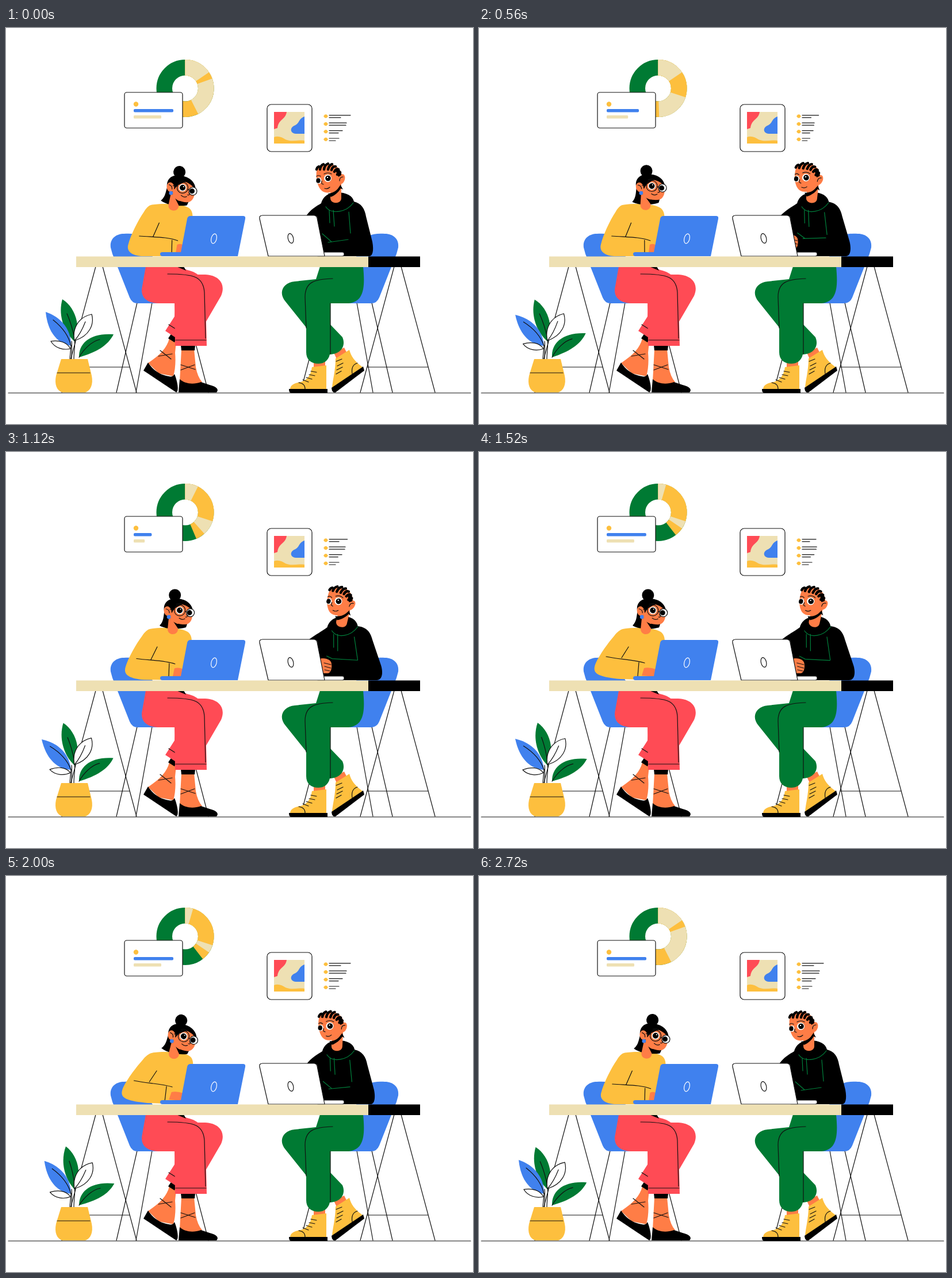
Animation, 812 px wide and 689 px high, one loop 2800 ms. Source, as an HTML page:

```html
<!DOCTYPE html>
<html lang="en">
<head>
<meta charset="utf-8">
<title>Two people at a shared desk</title>
<style>
html, body { margin: 0; width: 100%; height: 100%; overflow: hidden; background: #fff; }
svg { display: block; width: 100%; height: 100%; }
.blue { fill: #4081ee; }
.yellow { fill: #fdbf3e; }
.beige { fill: #eee0b3; }
.green { fill: #007a33; }
.red { fill: #ff4b55; }
.skin { fill: #ff7d46; }
.white { fill: #fff; }
.ink { fill: none; stroke: #111; stroke-width: 1.2; stroke-linecap: round; stroke-linejoin: round; }
.white.ink { fill: #fff; }
.seam { fill: none; stroke: #00803c; stroke-width: 1.2; stroke-linecap: round; }
#donut circle { fill: none; stroke-width: 27.5; }
</style>
</head>
<body>
<svg viewBox="0 0 812 689" xmlns="http://www.w3.org/2000/svg">
  <defs>
    <g id="chair">
      <path class="ink" stroke-width="1" d="M228 478L192 634M254 478L226 634M311 478L352 634"/>
      <path class="blue" d="M182 382C180 367 191 358 205 358C216 357 226 358 235 362L300 479H229Q219 479 215 469L185 393Z"/>
    </g>
  </defs>

  <g id="donut" transform="rotate(-90 311.5 105)"></g>
  <g>
    <rect class="white ink" x="206" y="112" width="101" height="62" rx="4"/>
    <circle class="yellow" cx="226" cy="132.500" r="4.200"/>
    <rect class="blue" id="bar1" x="222" y="141" height="5.600" rx="2"/>
    <rect class="beige" id="bar2" x="222" y="152" height="5.400" rx="1.500"/>
  </g>

  <g>
    <rect class="white ink" x="454" y="133" width="78" height="82" rx="7"/>
    <path class="beige" d="M466 146H519V201H466Z"/>
    <path class="red" d="M466 146H488C486 160 474 158 472 174L466 176Z"/>
    <path class="blue" d="M519 154C508 158 511 166 501 170C493 174 494 183 504 184H519Z"/>
    <path class="yellow" d="M466 190C473 187 480 190 486 194C497 199 508 194 519 196V201H466Z"/>
  </g>
  <g id="list"></g>

  <path class="ink" d="M4 635H808"/>
  <path class="ink" d="M156 415L97 634M168 415L227 634M109 590H215M687 415L746 634M675 415L616 634M628 590H734"/>
  <use href="#chair"/>
  <use href="#chair" transform="translate(864) scale(-1 1)"/>

  <g id="plant">
    <path class="ink" d="M111 576L113 552M114 576C114 562 115 552 114 545M118 576C118 562 121 550 119 542"/>
    <g id="leaf0">
      <path class="green" d="M120 546C101 530 90 500 98 472C113 481 123 500 124 518C124 532 122 540 120 546Z"/>
      <path class="ink" d="M106 497Q116 520 120 546"/>
    </g>
    <g id="leaf1">
      <path class="white ink" d="M119 544C115 524 125 503 149 498C154 516 145 536 119 544Z"/>
      <path class="ink" d="M119 544Q130 532 138 511"/>
    </g>
    <g id="leaf2">
      <path class="blue" d="M113 553C86 548 72 525 69 494C96 503 114 525 113 553Z"/>
      <path class="ink" d="M113 553C109 535 96 519 82 508"/>
    </g>
    <path class="white ink" id="leaf3" d="M112 558C100 561 85 557 78 545C92 543 106 546 112 558Z"/>
    <g id="leaf4">
      <path class="green" d="M127 573C126 548 147 530 187 533C177 553 157 564 127 573Z"/>
      <path class="ink" d="M127 573C135 559 149 545 163 542"/>
    </g>
    <path class="yellow" d="M96 576H142L149 605C152 620 147 631 138 634H98C88 631 84 620 87 605Z"/>
    <path class="ink" d="M89 600H146"/>
  </g>

  <g id="womanLegs">
    <path class="skin" d="M284 540L296 545L294 565Q296 588 291 606L266 601L247 583C263 572 279 560 284 540Z"/>
    <path d="M288 531L282 540L293 547L297 538Z"/>
    <path d="M247 582L239 596L296 634C300 633 300 620 293 602C290 607 288 607 283 606C268 604 255 595 247 582Z"/>
    <path class="ink" d="M268 561L287 576M265 571L289 567"/>
    <path class="skin" d="M305 559H327L330 590Q333 607 341 616L322 626L302 615Z"/>
    <path d="M304 552H329L328 561H305Z"/>
    <path d="M302 611L300 634H366C371 629 366 624 354 621L339 616C325 621 311 619 302 611Z"/>
    <path class="ink" d="M304 586L329 594M304 595L328 586"/>
    <path class="red" d="M300 429H346C373 430 382 448 374 466L342 521L300 542L277 527L293 502Z"/>
    <path class="ink" d="M283 516L294 523"/>
    <path class="red" d="M243 415H300L315 421C338 426 348 440 347 470L349 553H294L293 479H264C241 478 233 465 237 449Z"/>
    <path d="M296 415H309L313 422Z"/>
    <path class="ink" d="M281 428C326 428 343 432 345 460L347 540M295 543H348"/>
  </g>

  <g id="manLegs">
    <path class="skin" d="M535 580H555V594H535ZM570 565L588 556L593 566L575 576Z"/>
    <path class="yellow" d="M573 575L597 560C600 571 606 580 620 590L567 626C568 612 573 596 573 575Z"/>
    <path d="M566 626L621 589L623 596L573 634Q567 636 566 626Z"/>
    <path class="ink" d="M574 580L584 576M576 588L586 583M575 595L585 590M574 602L583 597M602 602C600 590 604 585 611 583"/>
    <path class="yellow" d="M532 590L557 587V629H494C494 622 500 618 512 616C523 613 530 605 532 590Z"/>
    <path d="M492 628H559V635H495Q492 634 492 628Z"/>
    <path class="ink" d="M530 597L540 599M527 603L537 605M522 608L532 611M516 612L526 616M509 617C517 618 520 623 520 628"/>
    <path class="green" d="M546 415H621C624 448 624 476 596 479H564V516L585 538C591 552 584 567 563 568C560 580 552 584 543 584C529 584 522 576 522 564V521L486 476C473 461 481 443 502 441L539 437Z"/>
    <path class="ink" d="M568 436C536 437 520 442 520 468L522 522M564 479V567"/>
  </g>

  <g id="woman">
    <g id="torso">
      <path class="yellow" id="sweater"/>
      <path class="skin" id="hand"/>
      <path class="ink" id="folds"/>
    </g>
    <g id="head">
      <path d="M279 266C272 280 277 292 267 302C279 309 300 309 313 305L318 290V268Z"/>
      <path class="skin" d="M283 288L281 308C281 320 299 320 299 308V296Z"/>
      <path d="M291 295Q300 302 309 299L299 307Z"/>
      <path class="skin" d="M284 270C296 260 314 262 321 271L324 283C324 293 319 300 311 300C300 300 290 297 286 290Z"/>
      <circle cx="293.500" cy="249" r="10.500"/>
      <path d="M275 277C272 262 283 254 296 255C312 255 324 264 325 277C319 270 313 267 306 265C299 269 291 272 289 279L282 283Z"/>
      <ellipse class="skin" cx="281" cy="277" rx="6.500" ry="8.500" transform="rotate(-15 281 277)"/>
      <path class="ink" d="M278 273Q284 274 284 280M285 274L293 274M311 277L314 278"/>
      <circle class="blue" cx="283" cy="287" r="3.400"/>
      <circle class="white" cx="302" cy="275.500" r="6.500"/>
      <circle cx="302" cy="275.500" r="5"/>
      <circle class="ink" cx="302" cy="275.500" r="9.600" stroke-width="1.500"/>
      <circle class="white ink" cx="320.500" cy="279.500" r="7"/>
      <circle cx="319" cy="279.500" r="4.500"/>
      <circle class="white" cx="303.500" cy="273.500" r="1"/>
      <path class="ink" d="M296 265Q301 262 306 265M314 283Q317 288 312 287M301 289Q306 293 311 290"/>
    </g>
  </g>

  <g id="man">
    <path id="hoodie"/>
    <path class="seam" id="seams"/>
    <g id="fist">
      <path class="skin" d="M544 360C556 357 566 362 566 369C567 376 565 384 560 385H544Z"/>
      <path class="ink" d="M553 367L565 370M554 373L565 376M554 379L563 381"/>
    </g>
    <g id="face">
      <path class="skin" d="M564 276V296C564 307 583 307 583 296V270Z"/>
      <path d="M560 288C571 287 578 281 581 272L586 281L582 279C578 286 572 291 565 294Z"/>
      <path class="skin" d="M540 249C538 264 543 281 552 285C561 289 572 284 581 274L584 255C581 242 570 236 560 237C550 237 541 242 540 249Z"/>
      <ellipse class="skin" cx="583.500" cy="263" rx="5.500" ry="9" transform="rotate(18 583.500 263)"/>
      <path class="ink" d="M586 259Q580 259 580 266"/>
      <path d="M572 246C577 241 583 248 583 256L578 259Z"/>
      <path fill="none" stroke="#000" stroke-width="4.400" stroke-linecap="round" d="M540 246q1-4 4-5M546 246q1-7 6-9M553 246q1-8 7-10M560 246q2-8 7-9M566 247q2-7 7-6M571 250q3-6 7-4M576 255q2-5 5-4"/>
      <g id="eyes">
        <ellipse class="white" cx="544" cy="265.500" rx="4.500" ry="5.500"/>
        <circle class="white" cx="559.500" cy="261.500" r="6.500"/>
        <ellipse cx="543" cy="265.500" rx="3.700" ry="4.300"/>
        <circle cx="560" cy="261.500" r="4.800"/>
        <path class="white" d="M558 259h2v2h-2z"/>
      </g>
      <path class="ink" id="lids" d="M541 268Q545 271 549 268M556 264Q561 266 567 261"/>
      <path class="ink" d="M540 258Q543 255 547 258M553 254Q560 250 566 254M549 266L549 271L552 272M554 279Q559 281 563 277"/>
    </g>
  </g>

  <path class="blue" d="M321 327H412Q417 327 416 332L403 397H272Q268 397 268 393Q268 390 272 390H304L315 332Q316 327 321 327Z"/>
  <ellipse cx="361.500" cy="366.500" rx="4.600" ry="8.600" fill="none" stroke="#fff" stroke-width="1.200" transform="rotate(14 361.500 366.500)"/>
  <rect class="white ink" x="540" y="390" width="48" height="7" rx="3"/>
  <path class="white ink" d="M446 326H535Q540 326 541 331L554 397H456L441 332Q440 326 446 326Z"/>
  <ellipse class="ink" cx="495" cy="366" rx="4.600" ry="8.600" transform="rotate(-14 495 366)"/>

  <path class="beige" d="M122 397.500H630V416H122Z"/>
  <path d="M630 397.500H720V416H630Z"/>
</svg>
<script>
const LOOP = 2800, STEP = 80;
const BEATS = [0, 400, 800, 1520, 2000, 2400, 2720];
const BEIGE = '#eee0b3', YELLOW = '#fdbf3e', GREEN = '#007a33';
const $ = id => document.getElementById(id);

function add(parent, tag, attrs) {
  const el = document.createElementNS('http://www.w3.org/2000/svg', tag);
  for (const k in attrs) el.setAttribute(k, attrs[k]);
  return parent.appendChild(el);
}

// Eased value of a looping track
function at(t, values, times = BEATS) {
  let i = times.length - 1;
  while (i > 0 && times[i] > t) i--;
  if (t < times[0]) return values[0];
  const last = i === times.length - 1;
  const end = last ? LOOP : times[i + 1];
  const to = last ? values[0] : values[i + 1];
  const p = (t - times[i]) / (end - times[i]);
  return values[i] + (to - values[i]) * p * p * (3 - 2 * p);
}

// Blend two paths that share the same commands
function blend(a, b, k) {
  const nums = b.match(/[\d.]+/g);
  let i = 0;
  return a.replace(/[\d.]+/g, n => (+n + (nums[i++] - n) * k).toFixed(2));
}

const shapes = {
  sweater: [
    'M250 308C262 305 300 305 312 311C320 314 323 320 323 330L305 397L235 397C218 396 209 388 212 377C216 360 228 335 238 320C242 313 246 309 250 308Z',
    'M250 308C262 305 300 305 312 311C320 314 323 320 323 330L305 397L246 395C205 391 197 385 202 370C207 357 222 335 235 320C240 313 246 309 250 308Z'],
  hand: [
    'M297 377Q303 374 308 378L306 391L295 391Z',
    'M287 376Q296 374 308 378L306 391L283 389Z'],
  folds: [
    'M231 362C255 364 280 363 298 370M288 369L288 390M265 339L255 363',
    'M221 356C245 361 268 361 288 367M278 366L276 390M260 339L248 358'],
  hoodie: [
    'M548 305C552 290 565 286 575 286C592 286 603 292 605 302C618 305 624 315 626 328L637 372C640 388 637 397 632 397L548 397L541 328L522 327C530 315 540 310 548 305Z',
    'M559 305C563 290 577 286 587 286C600 286 610 292 612 303C628 305 634 313 638 328L653 372C657 386 654 397 645 397L548 397L541 328L526 327C538 318 550 312 559 305Z'],
  seams: [
    'M556 311C565 325 592 321 604 304M562 317L563 339M569 317L571 345M596 320L599 357M550 358L566 372M560 373L595 368',
    'M567 311C576 325 600 321 612 304M570 317L570 340M577 317L577 346M606 322L612 362M558 355L567 359M567 359L612 362']
};

const leaves = [
  { pivot: '120 546', sway: [0, -1.5, 0, 3, 4.6, 2.3, .4] },
  { pivot: '119 544', sway: [0, -2, -2, 1, 1.5, .6, .2] },
  { pivot: '113 553', sway: [0, -5, -7.8, -6.1, -2.3, -.6, 0] },
  { pivot: '112 558', sway: [0, -5.5, -11.5, -13, -8.5, -3.5, -.5] },
  { pivot: '127 573', sway: [0, -2, -1.7, 1, 2, 1, .2] }
];

// Slices are stacked, the widest at the back
const slices = [
  [GREEN, [360], [0]],
  [YELLOW, [200, 200, 142, 142, 200], [0, 880, 1240, 2120, 2400]],
  [BEIGE, [153, 153, 178, 178, 124, 124, 153], [0, 40, 400, 880, 1240, 2120, 2400]],
  [YELLOW, [70, 70, 108, 108, 70], [0, 40, 400, 2120, 2400]],
  [BEIGE, [56, 56, 16, 16, 56], [0, 880, 1240, 2120, 2400]]
].map(([stroke, values, times]) => ({
  values, times,
  el: add($('donut'), 'circle', { cx: 311.5, cy: 105, r: 36.25, pathLength: 360, stroke })
}));

const rows = [
  { long: 37, short: 20, dip: [.65, .65] },
  { long: 30, short: 29, dip: [.54, .84] },
  { long: 23, short: 16, dip: [.74, .9] },
  { long: 17, short: 11, dip: [.68, 1] }
];
rows.forEach((row, i) => {
  const y = 153.5 + 13.4 * i;
  add($('list'), 'path', { class: 'yellow', d: `M552 ${y}l2.500-3h3l2.500 3l-2.500 3h-3z` });
  row.lines = [-1.7, 2.3].map(dy => add($('list'), 'path', { class: 'ink' }));
  row.y = y;
});

function draw(t) {
  for (const s of slices) s.el.setAttribute('stroke-dasharray', at(t, s.values, s.times) + ' 400');

  const barTimes = [0, 360, 800, 1000, 1540];
  $('bar1').setAttribute('width', at(t, [69, 69, 39, 26, 69], barTimes));
  $('bar2').setAttribute('width', at(t, [48, 48, 23, 15, 48], barTimes));

  for (const { y, long, short, dip, lines } of rows) {
    const k = at(t, [1, dip[0], 1, dip[1], 1, 1, 1]);
    lines[0].setAttribute('d', `M562 ${y - 1.7}h${long * k}`);
    lines[1].setAttribute('d', `M562 ${y + 2.3}h${short * k}`);
  }

  leaves.forEach(({ pivot, sway }, i) =>
    $('leaf' + i).setAttribute('transform', `rotate(${at(t, sway)} ${pivot})`));

  const elbow = at(t, [0, 0, 0, 1, 1, .75, 0]);
  const lean = at(t, [2, -1, 0, 0, 3, 2, 2]) / 87;
  const sit = at(t, [0, .18, 1, .9, .18, 0, 0]);
  for (const id in shapes) {
    const k = id === 'hoodie' || id === 'seams' ? sit : elbow;
    $(id).setAttribute('d', blend(...shapes[id], k));
  }
  $('torso').setAttribute('transform', `matrix(1 0 ${-lean} 1 ${397 * lean} 0)`);
  $('head').setAttribute('transform', `rotate(${at(t, [6.5, -3, 0, .3, 9, 6.5, 6.5])} 284 321)`);
  $('fist').setAttribute('transform', `translate(${-24 * (1 - Math.min(1, sit * 1.1))})`);
  $('face').setAttribute('transform', `translate(${9.5 * sit}) rotate(${14 * sit} 572 300)`);

  const shut = t >= 320 && t <= 480;
  $('eyes').setAttribute('visibility', shut ? 'hidden' : 'visible');
  $('lids').setAttribute('visibility', shut ? 'visible' : 'hidden');
}

function tick() {
  draw(Math.floor(performance.now() % LOOP / STEP) * STEP);
  requestAnimationFrame(tick);
}
tick();
</script>
</body>
</html>
```
